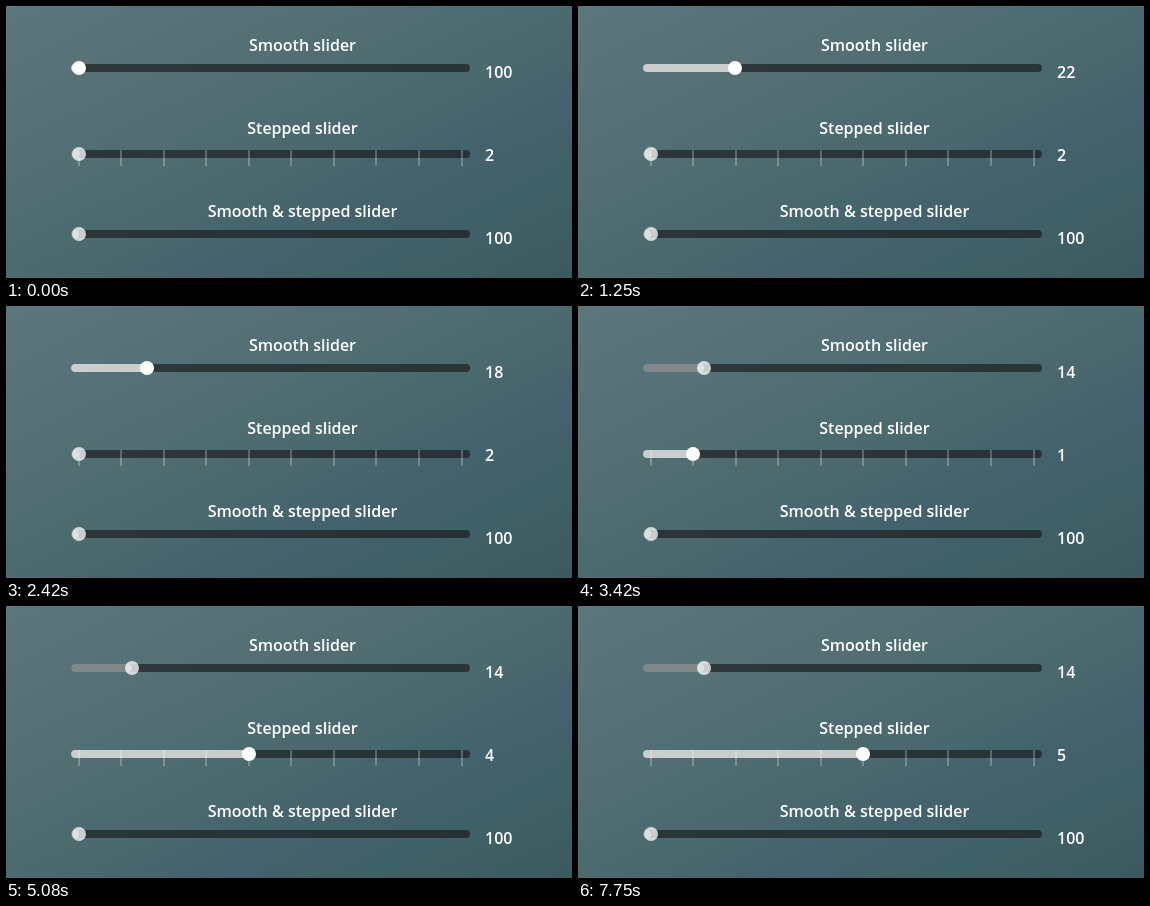
Animation, 566 px wide and 272 px high, one loop 8000 ms. Source, as an HTML page:

```html
<!DOCTYPE html>
<html lang="en">
<head>
<meta charset="utf-8">
<title>Sliders</title>
<style>
  html, body { margin: 0; width: 100%; height: 100%; overflow: hidden; }
  body {
    background: linear-gradient(to bottom right,
      #5d767c, #547075 28%, #4c6a6e 50%, #44626c 68%, #3f6066 83%, #3a5a5f);
  }
  svg { display: block; width: 566px; height: 272px; }
  text { font: 600 16px "Open Sans", "Noto Sans", sans-serif; fill: #fff; }
</style>
</head>
<body>
<svg id="stage" viewBox="0 0 566 272"></svg>
<script>
const LOOP = 8000, FRAME = 1000 / 12;
const LEFT = 65, WIDTH = 399, RADIUS = 8, TRAVEL = WIDTH - 2 * RADIUS;
const stage = document.getElementById('stage');

function add(tag, attrs, content = '') {
  const node = document.createElementNS('http://www.w3.org/2000/svg', tag);
  for (const name in attrs) node.setAttribute(name, attrs[name]);
  node.textContent = content;
  return stage.appendChild(node);
}

function makeSlider(title, titleY, y, ticks = 0) {
  const bar = { x: LEFT, y: y - 4, height: 8, rx: 4 };
  add('text', { x: 296.5, y: titleY, 'text-anchor': 'middle' }, title);
  add('rect', { ...bar, width: WIDTH, fill: '#1a1a1a', 'fill-opacity': 0.65 });
  const fill = add('rect', { ...bar, fill: '#fff' });
  for (let i = 0; i < ticks; i++) {
    const x = LEFT + RADIUS - 1 + Math.floor(i * TRAVEL / (ticks - 1));
    add('rect', { x, y: y - 4, width: 2, height: 16, fill: '#fff', 'fill-opacity': 0.25 });
  }
  const knob = add('circle', { cy: y, r: 7, fill: '#fff' });
  const label = add('text', { x: 479, y: titleY + 27 });

  return (ratio, text, active) => {
    const reach = Math.floor(ratio * TRAVEL + 1e-6) + RADIUS;
    fill.setAttribute('width', reach);
    fill.setAttribute('fill-opacity', active ? 0.75 : 0.4);
    knob.setAttribute('cx', LEFT + reach);
    knob.setAttribute('fill-opacity', active ? 1 : 0.75);
    label.textContent = text;
  };
}

const smooth = makeSlider('Smooth slider', 45, 62);
const stepped = makeSlider('Stepped slider', 128, 148, 10);
const both = makeSlider('Smooth & stepped slider', 211, 228);

// [time, value]: dragged between points, sampled at 12 fps
const drag = [[0, 0], [333, 0], [417, 1], [583, 4], [667, 4], [750, 7], [833, 10],
  [1583, 32], [1833, 32], [1917, 30], [2583, 14], [LOOP, 14]];
// [time, value]: jumps
const jumps = [[0, 0], [3420, 1], [3830, 2], [4170, 3], [4420, 4], [4670, 5],
  [5080, 4], [5420, 3], [5670, 2], [6000, 3], [6250, 4], [7170, 5]];

function dragValue(t) {
  const time = Math.floor((t + 5) / FRAME) * FRAME;
  const i = Math.max(1, drag.findIndex(([at]) => at >= time));
  const [t0, v0] = drag[i - 1], [t1, v1] = drag[i];
  return Math.round(v0 + (v1 - v0) * (time - t0) / (t1 - t0));
}

function draw(t) {
  const value = dragValue(t);
  const step = jumps.filter(([at]) => at <= t).pop()[1];
  const onStepped = t >= 2830;
  smooth(value / 100, t < 415 ? 100 : value, !onStepped);
  stepped(step / 9, t < 3420 ? 2 : step, onStepped);
  both(0, 100, false);
}

function tick() {
  draw(performance.now() % LOOP);
  requestAnimationFrame(tick);
}
tick();
</script>
</body>
</html>
```
